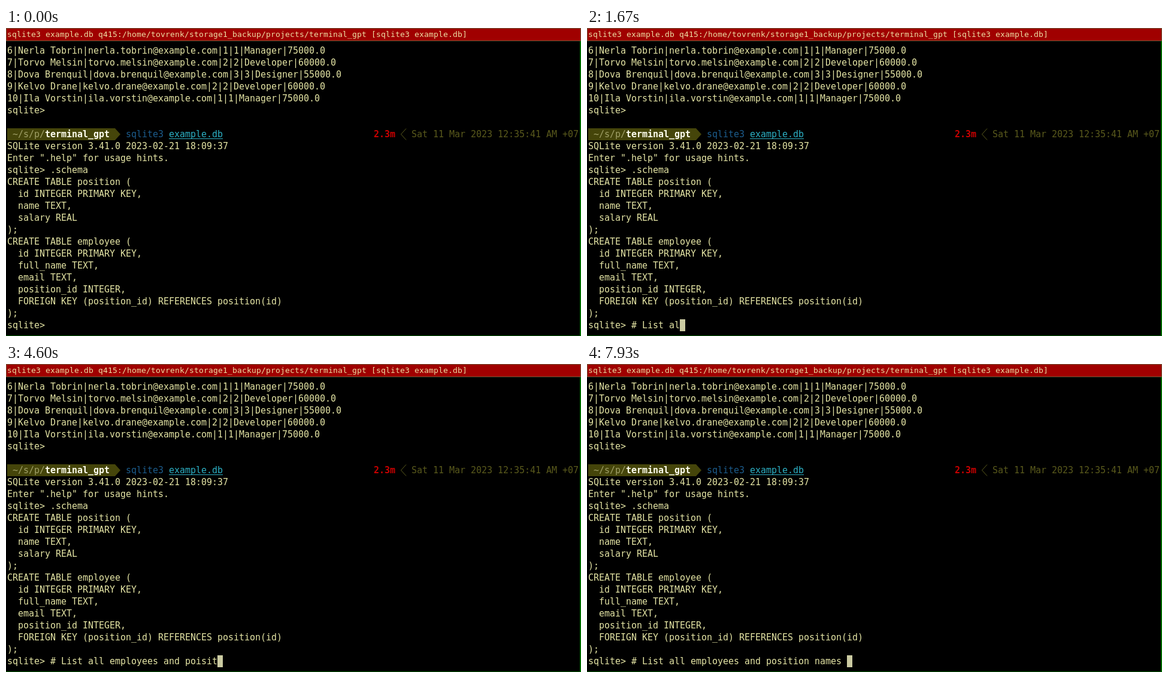
Animation, 960 px wide and 516 px high, one loop 8000 ms. Source, as an HTML page with a canvas:

```html
<!DOCTYPE html>
<html lang="en">
<head>
<meta charset="utf-8">
<title>Terminal</title>
<style>
html, body { margin: 0; width: 100%; height: 100%; overflow: hidden; background: #000; }
canvas { display: block; }
</style>
</head>
<body>
<canvas id="stage" width="960" height="516"></canvas>
<script>
const ctx = document.getElementById('stage').getContext('2d');
const LOOP = 8000, CELL = 9, ROW = 20, LEFT = 2, TOP = 28;
const FONT = '"DejaVu Sans Mono", monospace';
const INK = '#e4e4a4', CURSOR = '#cbcba2';
const PROMPT_ROW = 23, PROMPT = 'sqlite> ';

const staff = [
  [6, 'Nerla Tobrin', '1|1|Manager|75000.0'],
  [7, 'Torvo Melsin', '2|2|Developer|60000.0'],
  [8, 'Dova Brenquil', '3|3|Designer|55000.0'],
  [9, 'Kelvo Drane', '2|2|Developer|60000.0'],
  [10, 'Ila Vorstin', '1|1|Manager|75000.0'],
].map(([id, name, rest]) =>
  `${id}|${name}|${name.toLowerCase().replace(' ', '.')}@example.com|${rest}`);

const lines = [...staff, PROMPT, '', '',
  'SQLite version 3.41.0 2023-02-21 18:09:37',
  'Enter ".help" for usage hints.',
  'sqlite> .schema',
  'CREATE TABLE position (',
  '  id INTEGER PRIMARY KEY,',
  '  name TEXT,',
  '  salary REAL',
  ');',
  'CREATE TABLE employee (',
  '  id INTEGER PRIMARY KEY,',
  '  full_name TEXT,',
  '  email TEXT,',
  '  position_id INTEGER,',
  '  FOREIGN KEY (position_id) REFERENCES position(id)',
  ');',
  PROMPT];

// Keystrokes ('<' is backspace) with the time of each one in ms.
const typing = [
  ['# ', 530, 730],
  ['List ', 930, 1070, 1130, 1270, 1400],
  ['all ', 1530, 1670, 1800, 1930],
  ['employees ', 2200, 2270, 2330, 2470, 2670, 2870, 3270, 3270, 3400, 3470],
  ['and ', 3600, 3670, 3730, 3870],
  ['poisiti', 3930, 4130, 4270, 4400, 4530, 4600, 4670],
  ['<<<<<<', 5130, 5200, 5270, 5330, 5400, 5530],
  ['osition ', 5670, 5730, 5800, 5870, 5930, 6000, 6070, 6200],
  ['nm<ames ', 6400, 6600, 6870, 6930, 7070, 7200, 7400, 7600],
];
const keys = typing.flatMap(([chars, ...times]) => [...chars].map((key, i) => ({ key, at: times[i] })));

function typed(t) {
  return keys.filter(k => k.at <= t)
    .reduce((text, { key }) => key === '<' ? text.slice(0, -1) : text + key, '');
}

function rect(color, x, y, w, h) {
  ctx.fillStyle = color;
  ctx.fillRect(x, y, w, h);
}

// Draws text on a fixed character grid.
function grid(text, x, y, color, cell, font) {
  ctx.font = font;
  ctx.fillStyle = color;
  [...text].forEach((c, i) => { if (c !== ' ') ctx.fillText(c, x + i * cell, y); });
}

function put(text, row, col = 0, color = INK, weight = '') {
  grid(text, LEFT + col * CELL, TOP + row * ROW + 15, color, CELL, `${weight} 15px ${FONT}`);
}

function drawFrame() {
  rect('#b00000', 0, 0, 960, 22);
  rect('#a00000', 1, 1, 958, 20);
  rect('#6e5a3a', 0, 0, 960, 1);
  rect('#6e5a3a', 0, 21, 960, 1);
  rect('#6e5a3a', 0, 0, 1, 22);
  rect('#6e5a3a', 959, 0, 1, 22);
  grid('sqlite3 example.db q415:/home/tovrenk/storage1_backup/projects/terminal_gpt [sqlite3 example.db]',
    2, 15, '#eedfa4', 8, `13px ${FONT}`);
  rect('#006a00', 958, 22, 2, 494);
  rect('#005200', 0, 515, 960, 1);
}

function drawShellPrompt() {
  const row = 7, y = TOP + row * ROW;
  ctx.fillStyle = '#45450a';
  ctx.beginPath();
  ctx.moveTo(2, y);
  ctx.lineTo(182, y);
  ctx.lineTo(191, y + 10);
  ctx.lineTo(182, y + 20);
  ctx.lineTo(2, y + 20);
  ctx.fill();
  put('~/s/p/', row, 1, '#a0a068');
  put('terminal_gpt', row, 7, '#ffffee', 'bold');
  put('sqlite3', row, 22, '#1c5c8c');
  put('example.db', row, 30, '#2cb0c4');
  rect('#2cb0c4', 272, y + 17, 90, 1);
  put('2.3m', row, 68, '#c80000', 'bold');
  ctx.strokeStyle = '#5a5a1c';
  ctx.lineWidth = 1;
  ctx.beginPath();
  ctx.moveTo(668, y + 0.5);
  ctx.lineTo(659.5, y + 10);
  ctx.lineTo(668, y + 19.5);
  ctx.stroke();
  put('Sat 11 Mar 2023 12:35:41 AM +07', row, 75, '#5a5a1c');
}

function draw(t) {
  rect('#000', 0, 0, 960, 516);
  drawFrame();
  lines.forEach((line, row) => put(line, row));
  drawShellPrompt();
  const input = typed(t), col = PROMPT.length + input.length;
  put(input, PROMPT_ROW, PROMPT.length);
  if (t >= 70) rect(CURSOR, LEFT + col * CELL, TOP + PROMPT_ROW * ROW, CELL, ROW);
}

const start = performance.now();
function tick() {
  draw((performance.now() - start) % LOOP);
  requestAnimationFrame(tick);
}
tick();
</script>
</body>
</html>
```
